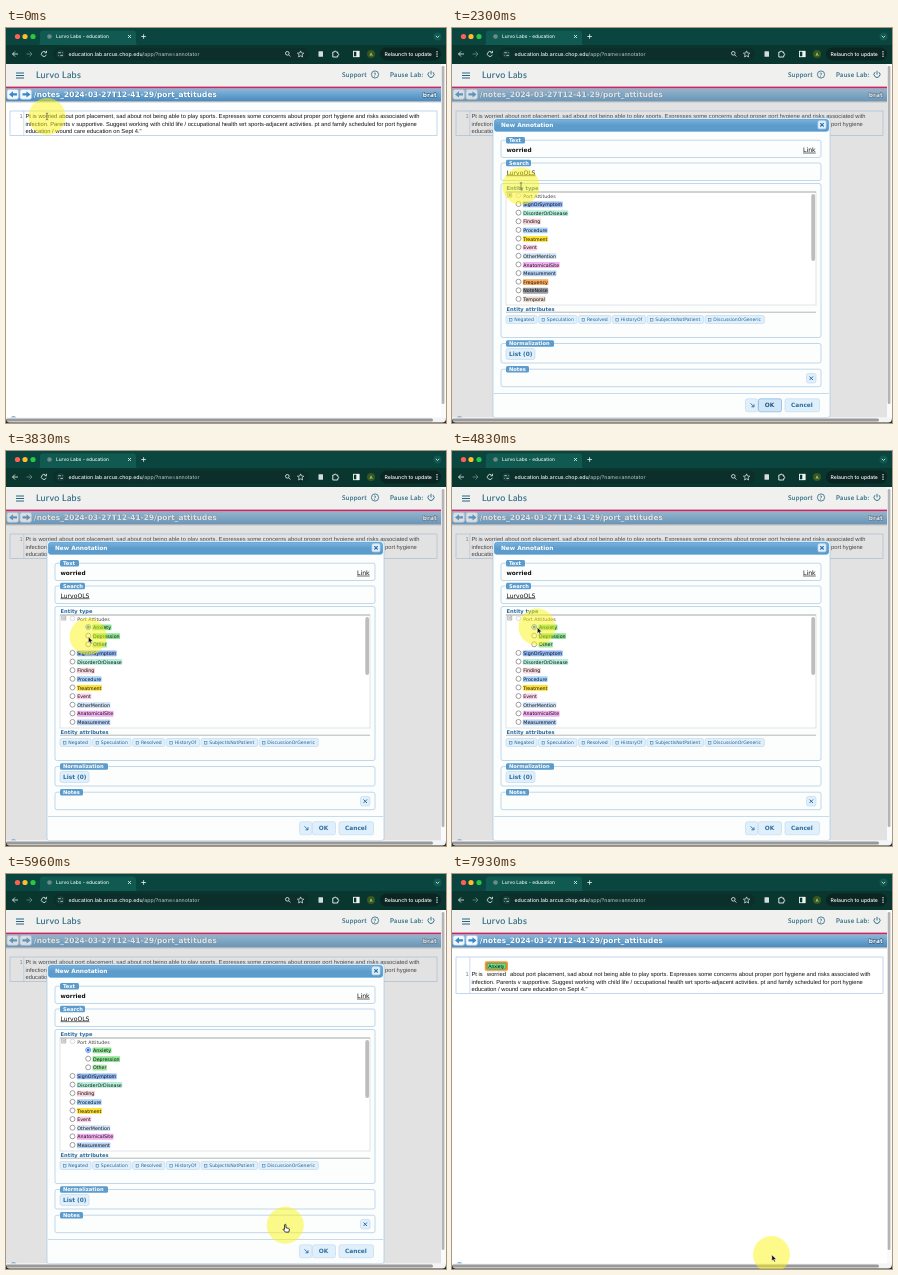
These frames come from a looping animation (440x395 px, 8 s). An HTML page:

```html
<!DOCTYPE html>
<html lang="en">
<head>
<meta charset="utf-8">
<title>Annotation demo</title>
<style>
html, body { margin: 0; width: 440px; height: 395px; overflow: hidden; background: #fff; }
svg { display: block; text-rendering: geometricPrecision; }
text { white-space: pre; }
.v { font-family: "DejaVu Sans", sans-serif; }
.b { font-family: "DejaVu Sans", sans-serif; font-weight: bold; }
.a { font-family: "Liberation Sans", Arial, sans-serif; font-size: 5.785px; }
.u { font-family: Inter, sans-serif; font-size: 5.2px; font-weight: 500; }
.l { font-family: Lato, sans-serif; letter-spacing: .3px; fill: #28677f; stroke: #28677f; stroke-width: .12px; }
</style>
</head>
<body>
<svg id="stage" width="440" height="395" viewBox="0 0 440 395" xmlns="http://www.w3.org/2000/svg"></svg>
<script>
const LOOP = 8000;
const stage = document.getElementById('stage');

// markup helpers
const rect = (x, y, w, h, fill, more = '') =>
  `<rect x="${x}" y="${y}" width="${w}" height="${h}" fill="${fill}" ${more}/>`;
const box = (x, y, w, h, fill, line, r = 2, more = '') =>
  rect(x, y, w, h, fill, `stroke="${line}" stroke-width=".7" rx="${r}" ${more}`);
const text = (x, y, cls, s, size, fill = '#111', more = '') =>
  `<text x="${x}" y="${y}" class="${cls}" style="font-size:${size}px" fill="${fill}" ${more}>${s}</text>`;
const line = (d, color, w = .8, more = '') =>
  `<path d="${d}" fill="none" stroke="${color}" stroke-width="${w}" ${more}/>`;
const dot = (x, y, r, fill, more = '') => `<circle cx="${x}" cy="${y}" r="${r}" fill="${fill}" ${more}/>`;
const group = (id, s) => `<g id="${id}">${s}</g>`;

function browser() {
  const w = '#eef5f3';
  return rect(0, 0, 440, 36, '#0a463f') +
    '<path d="M31 17.500Q34 17.500 34 14V6Q34 2.500 37 2.500H127Q130 2.500 130 6V14Q130 17.500 133 17.500Z" fill="#115a51"/>' +
    rect(0, 17, 440, 19, '#0a3630') +
    dot(11.500, 8.500, 2.600, '#fe5f57') + dot(19, 8.500, 2.600, '#febc2e') + dot(27, 8.500, 2.600, '#28c840') +
    dot(43.500, 8.500, 2.300, '#6f8a87') +
    text(50, 10.300, 'u', 'Lurvo Labs - education', 4.800, w) +
    line('M122 7l3 3m0-3l-3 3M135.300 8.500h4.600M137.600 6.200v4.600', w, .8) +
    dot(431.500, 8.500, 4, '#12594f') + line('M429.800 7.800l1.700 1.700l1.700-1.700', w, .8) +
    line('M12 26H6.500m2.500-2.500l-2.500 2.500l2.500 2.500', w) +
    line('M20.500 26h5.500m-2.500-2.500l2.500 2.500l-2.500 2.500', '#718986') +
    line('M39.800 24.300a2.500 2.500 0 1 0 .5 2.500M40.500 22.800v2h-2', w) +
    rect(47, 19.500, 256, 13, '#0c2f2b', 'rx="6.500"') +
    dot(54.500, 26, 4, '#163f3a') + line('M52.300 24.700h2.500m1.500 0h.6M52.300 27.400h.6m1.500 0h2.500', w, .7) +
    `<text x="62.500" y="27.700" class="u" fill="${w}">education.lab.arcus.chop.edu<tspan fill="#a3b8b5">/app/?name=annotator</tspan></text>` +
    line('M282.700 26.900l1.600 1.600', w) + dot(281.300, 25.300, 1.800, 'none', `stroke="${w}" stroke-width=".8"`) +
    '<path d="M294.600 22.900l.9 2.100l2.300.2l-1.700 1.500l.5 2.300l-2-1.200l-2 1.200l.5-2.300l-1.700-1.500l2.300-.2z" fill="none" stroke="#e6efed" stroke-width=".7"/>' +
    rect(312.500, 23.200, 4.500, 5.600, '#d5dddb', 'rx=".5"') +
    line('M326.800 24h1.500a.9.900 0 0 1 1.800 0h1.600v1.500a1 1 0 0 1 0 2v1.500h-4.900z', w, .9) +
    rect(347.500, 23.300, 5.500, 5.400, 'none', `stroke="${w}" stroke-width=".9"`) + rect(350.300, 23, 3, 6, w) +
    dot(365, 26, 4, '#35591c') + text(363.500, 27.700, 'u', 'A', 4.500, '#cfe4b6') +
    rect(374, 19.500, 61, 13, '#0a2522', 'rx="6.500"') +
    text(378.500, 27.700, 'u', 'Relaunch to update', 5.150, '#fff') +
    [23.700, 26, 28.300].map(y => dot(431, y, .7, w)).join('');
}

function siteHeader() {
  return rect(0, 36, 440, 23, '#f0f0ef') +
    line('M10 45h8M10 47.500h8M10 50h8', '#28677f', 1) +
    text(30, 49.500, 'l', 'Lurvo Labs', 8.900) +
    text(336, 48.600, 'l', 'Support', 6.500) + dot(369, 46.500, 3.600, 'none', 'stroke="#28677f" stroke-width=".8"') +
    text(367.500, 48.500, 'l', '?', 5.800) +
    text(384, 48.600, 'l', 'Pause Lab:', 6.500) +
    line('M423 44.200a3 3 0 1 0 4 0M425 42.800v3.700', '#28677f', .9) +
    rect(0, 58.600, 435, 2, '#c42a63');
}

function titleBar() {
  const nav = (x, d) => box(x, 61.500, 11.500, 9.800, '#f2f8fd', '#a9cbe6', 2) +
    `<path d="${d}" fill="#3a86c8"/>`;
  return rect(0, 60.600, 435, 12.600, 'url(#bar)') + rect(0, 73, 435, 2, 'url(#shade)') +
    nav(1, 'M3 66.400l4-3.200v2h4v2.400h-4v2z') + nav(14, 'M24.500 66.400l-4-3.200v2h-4v2.400h4v2z') +
    text(28.500, 69.400, 'b', '/notes_2024-03-27T12-41-29/port_attitudes', 7.470, '#35658c') +
    text(28, 68.900, 'b', '/notes_2024-03-27T12-41-29/port_attitudes', 7.470, '#fff') +
    text(416.800, 69.200, 'b', 'brat', 5.900, '#fff', 'stroke="#274e6e" stroke-width="1" paint-order="stroke"');
}

const LINES = [
  'Pt is ', 'worried', ' about port placement, sad about not being able to play sports. Expresses some concerns about proper port hygiene and risks associated with',
  'infection. Parents v supportive. Suggest working with child life / occupational health wrt sports-adjacent activities. pt and family scheduled for port hygiene',
  'education / wound care education on Sept 4."'
];
function note(y, h, wordX, restX) {
  const t = (x, dy, s) => `<text x="${x}" y="${y + dy}" class="a" fill="#111">${s}</text>`;
  return box(4, 83, 427, h, '#fff', '#a9c6e4', 0) + line(`M17.800 83v${h}`, '#b9d0ea', .7) +
    `<text x="13.600" y="${y}" class="a" fill="#777">1</text>` +
    t(19.500, 0, LINES[0]) + t(wordX, 0, LINES[1]) + t(restX, 0, LINES[2]) +
    t(19.500, 7.700, LINES[3]) + t(19.500, 15.400, LINES[4]);
}

function tagged() {
  return note(102, 36.500, 35, 56.400) +
    rect(32.800, 87.300, 23.200, 9.400, '#ff9632', 'rx="1.500"') +
    box(35, 89.200, 19, 5.800, '#6fdb8c', '#3f8a48', .8) +
    text(36.200, 93.800, 'a', 'Anxiety', 4.900, '#000') +
    line('M35 98q0-1 2-1h5.500q2 0 2-1q0 1 2 1h5.500q2 0 2 1', '#9bb59d', .4);
}

const field = (y, h, name, w) => box(49, y, 320, h, 'none', '#a6c9e2') +
  (name ? rect(54, y - 3.300, w, 6.600, '#5c9ccc', 'rx="1.500"') + text(57, y + 1.900, 'b', name, 5.150, '#fff') : '');

function button(x, y, w, h, s, tx, id = '') {
  return box(x, y, w, h, '#dfeffc', '#c5dbec', 2, id && `id="${id}Box"`) +
    text(tx, y + h / 2 + 2.100, 'b', s, 5.850, '#2e6e9e', id && `id="${id}Text"`);
}

function radio(x, y, on) {
  return dot(x, y - .3, 2.500, '#fff', `stroke="${on ? '#2273e0' : '#777'}" stroke-width=".7"`) +
    (on ? dot(x, y - .3, 1.500, '#2273e0') : '');
}
function label(x, y, s, color, on) {
  const w = widthOf(s, 4.750);
  return radio(x, y, on) + rect(x + 4.300, y - 2.800, w + 1, 5.800, color, 'rx=".8"') +
    text(x + 4.800, y + 1.800, 'v', s, 4.750);
}
const pen = document.createElement('canvas').getContext('2d');
function widthOf(s, size) {
  pen.font = '100px "DejaVu Sans", sans-serif';
  return pen.measureText(s).width * size / 100;
}

const KIDS = [['Anxiety', '#8fe596'], ['Depression', '#8fe596'], ['Other', '#a5e8a5']];
const TYPES = [['SignOrSymptom', '#92b6f2'], ['DisorderOrDisease', '#b5f0dc'], ['Finding', '#f4d3d9'],
  ['Procedure', '#a8d4fb'], ['Treatment', '#ffe23a'], ['Event', '#fbd0e8'], ['OtherMention', '#cfe2f6'],
  ['AnatomicalSite', '#f2b0f0'], ['Measurement', '#b5d2f8'], ['Frequency', '#f8ac5c'],
  ['NoteNoise', '#9a9da4'], ['Temporal', '#ecdccf']];
const row = i => 167.700 + 8.630 * i;

function tree(open) {
  const kids = open ? KIDS : [];
  return box(55.800, 165, 4, 4, '#fff', '#999', 0) + line('M56.600 167h2.400' + (open ? '' : 'M57.800 165.800v2.400'), '#444', .6) +
    dot(66.500, 167.400, 2.400, '#fafafa', 'stroke="#ccc" stroke-width=".6"') +
    text(71.300, 169.500, 'v', 'Port Attitudes', 4.750, '#444') +
    kids.map((k, i) => label(82.200, row(i + 1), k[0], k[1], i === 0)).join('') +
    TYPES.map((k, i) => label(66.500, row(i + 1 + kids.length), k[0], k[1])).join('') +
    rect(359.300, 166, 3.800, open ? 58 : 67, '#bdbdbd', 'rx="1.900"');
}

function attributes() {
  let x = 54;
  return ['Negated', 'Speculation', 'Resolved', 'HistoryOf', 'SubjectIsNotPatient', 'DiscussionOrGeneric'].map(s => {
    const w = widthOf(s, 4.600) + 11.500;
    const out = box(x, 287.500, w, 8, '#dfeffc', '#c5dbec', 1.500) +
      rect(x + 3.500, 290.600, 2.500, 2.500, 'none', 'stroke="#2e6e9e" stroke-width=".5"') +
      text(x + 8.300, 293.300, 'v', s, 4.600, '#2a6590');
    x += w + 1.500;
    return out;
  }).join('');
}

function dialog() {
  return rect(0, 60.600, 435, 329, '#aaa', 'opacity=".34"') +
    box(41, 90, 337, 299.500, '#fcfdfd', '#a6c9e2', 2) +
    box(42.500, 91.500, 334, 11.700, 'url(#head)', '#4297d7', 2) +
    text(49, 99.300, 'b', 'New Annotation', 5.800, '#fff') +
    box(366, 92.800, 8, 8, '#dfeffc', '#c5dbec', 1.500) + line('M368.300 95.100l3.400 3.400m0-3.400l-3.400 3.400', '#2e6e9e', 1.100) +
    field(112.200, 17.300, 'Text', 19) +
    text(54.500, 123.700, 'b', 'worried', 5.800) +
    text(351, 123.700, 'v', 'Link', 6.200, '#111', 'text-decoration="underline"') +
    field(135, 17.500, 'Search', 25) +
    text(54.500, 146.500, 'v', 'LurvoOLS', 6.070, '#111', 'text-decoration="underline"') +
    field(155.500, 154, '', 0) +
    text(54.500, 162, 'b', 'Entity type', 5.150, '#2a6ca0') +
    box(54, 164, 310, 113, '#fff', '#d4d8db', 0) + line('M54 164h310', '#999', .7) +
    '<g clip-path="url(#list)">' + group('closed', tree(false)) + group('open', tree(true)) + '</g>' +
    text(54.500, 282.600, 'b', 'Entity attributes', 5.150, '#2a6ca0') + line('M54 284.200h310', '#999', .7) +
    attributes() +
    field(315.500, 19.500, 'Normalization', 48) + button(54, 320.500, 29, 11, 'List (0)', 57) +
    field(341.200, 17.500, 'Notes', 23) +
    box(354.500, 345.500, 9.500, 9.500, '#dfeffc', '#c5dbec', 2) + line('M357.500 348.500l3.500 3.500m0-3.500l-3.500 3.500', '#2e6e9e', 1) +
    line('M42 365.500h335', '#b9d5ea', .8) +
    button(293.500, 370.800, 12.500, 13, '', 297) + line('M298.500 375.300l3.500 3.500m0-2.500v2.500h-2.500', '#2e6e9e', .9) +
    button(306.500, 370.800, 23, 13, 'OK', 312.800, 'ok') + button(333, 370.800, 34.500, 13, 'Cancel', 339);
}

function cursors() {
  const edge = 'fill="#111" stroke="#fff" stroke-width=".5"';
  return dot(0, 0, 18.500, '#fbf615', 'opacity=".5"') +
    group('beam', line('M-1.200-3.500q1.200 0 1.200 .8V2.500q0 .8-1.200 .8M1.200-3.500q-1.200 0-1.200 .8M0 2.500q0 .8 1.200 .8', '#444', .6)) +
    group('arrow', `<path d="M.3.200v6.300l1.500-1.300l1 2.200l1.100-.5l-1-2.100h2z" ${edge}/>`) +
    group('hand', '<path d="M-.7-.5q.8-.8 1.400 0v3l2.800.700q.9.300.6 1.500l-.6 2.200h-3.400l-2.200-2.500q0-.9.900-.6l.5.400z" fill="#fff" stroke="#111" stroke-width=".8"/>');
}

const grad = (id, ...stops) => `<linearGradient id="${id}" x2="0" y2="1">` +
  stops.map((c, i) => `<stop offset="${i / (stops.length - 1)}" stop-color="${c}"/>`).join('') + '</linearGradient>';

stage.innerHTML = '<defs>' + grad('bar', '#8bb8da', '#66a2cf', '#4c8abd') + grad('head', '#7db1da', '#5c9ccc', '#5c9ccc') +
  grad('shade', '#8fa0ae', '#ffffff') + '<clipPath id="list"><rect x="54" y="164.300" width="310" height="112"/></clipPath></defs>' +
  rect(0, 0, 440, 395, '#fff') + siteHeader() +
  group('plain', note(90, 24.500, 32.400, 51.400)) +
  rect(32.200, 84, 19.600, 7, '#6fa8f5', 'id="picked" opacity=".55"') +
  group('tagged', tagged()) + titleBar() +
  '<path d="M4.500 389.500q3-2.500 6 0z" fill="#4d8fc4"/>' + group('dialog', dialog()) +
  rect(435, 36, 5, 354, '#fafafa') + rect(435.700, 38, 2.700, 338, '#b4b4b4', 'rx="1.300"') +
  rect(0, 389.500, 440, 5.500, '#f4f4f4') + rect(0, 390.500, 427, 3, '#999', 'rx="1.500" id="scroll"') +
  '<path d="M0 390q0 4.500 4 4.500h432q4 0 4-4.500v5h-440z" fill="#22302f"/>' + browser() + group('mouse', cursors());

const el = id => document.getElementById(id);
const show = (id, on) => el(id).setAttribute('visibility', on ? 'visible' : 'hidden');
const set = (id, o) => { for (const k in o) el(id).setAttribute(k, o[k]); };

// pointer path: time, x, y
const PATH = [[0, 41, 88.500], [1960, 41, 88.500], [2300, 69, 158], [2480, 70, 167], [2730, 57, 167], [3660, 57, 167],
  [3830, 82, 185.500], [4000, 93, 184], [4200, 94, 179], [4430, 94, 179], [4560, 84, 177], [4700, 84, 177],
  [4830, 85, 176], [5360, 85, 176], [5960, 279, 351], [6160, 327, 386], [6300, 325, 388], [6700, 319.500, 380.500], [8000, 319.500, 380.500]];

// monotone cubic through the path points
function along(t, axis) {
  const slope = i => (PATH[i + 1][axis] - PATH[i][axis]) / (PATH[i + 1][0] - PATH[i][0]);
  const tangent = i => {
    if (i < 1 || i > PATH.length - 2) return 0;
    const a = slope(i - 1), b = slope(i);
    return a * b <= 0 ? 0 : 2 * a * b / (a + b);
  };
  let i = 0;
  while (i < PATH.length - 2 && t >= PATH[i + 1][0]) i++;
  const h = PATH[i + 1][0] - PATH[i][0], s = (t - PATH[i][0]) / h, p = PATH[i][axis];
  return p + (PATH[i + 1][axis] - p) * s * s * (3 - 2 * s) +
    h * s * (1 - s) * (tangent(i) * (1 - s) - tangent(i + 1) * s);
}

const STYLES = {
  normal: ['#dfeffc', '#c5dbec', '#2e6e9e'],
  hover: ['#d0e5f5', '#79b7e7', '#1d5987'],
  active: ['#f5f8f9', '#79b7e7', '#e17009']
};

function draw(t) {
  const within = (a, b) => t >= a && t < b;
  const x = along(t, 1), y = along(t, 2);
  set('mouse', { transform: `translate(${x.toFixed(2)} ${y.toFixed(2)})` });
  const kind = t < 2480 ? 'beam' : within(5400, 6160) && y > 341 && y < 359 ? 'hand' : 'arrow';
  for (const k of ['beam', 'arrow', 'hand']) show(k, k === kind);

  show('picked', within(760, 1000));
  show('plain', t < 7640);
  show('tagged', t >= 7640);
  const fading = within(930, 1000) || within(7460, 7500);
  set('dialog', { opacity: fading ? .5 : within(1000, 7460) ? 1 : 0 });
  const open = t >= 3200;
  set('closed', { display: open ? 'none' : 'inline' });
  set('open', { display: open ? 'inline' : 'none' });

  const ok = STYLES[t >= 7260 ? 'active' : t < 3060 || t >= 6480 ? 'hover' : 'normal'];
  set('okBox', { fill: ok[0], stroke: ok[1] });
  set('okText', { fill: ok[2] });
  const wide = within(6200, 6680);
  set('scroll', { y: wide ? 390 : 390.500, height: wide ? 4 : 3, fill: wide ? '#858585' : '#999' });
}

const start = performance.now();
function tick() {
  draw((performance.now() - start) % LOOP);
  requestAnimationFrame(tick);
}
tick();
</script>
</body>
</html>
```
